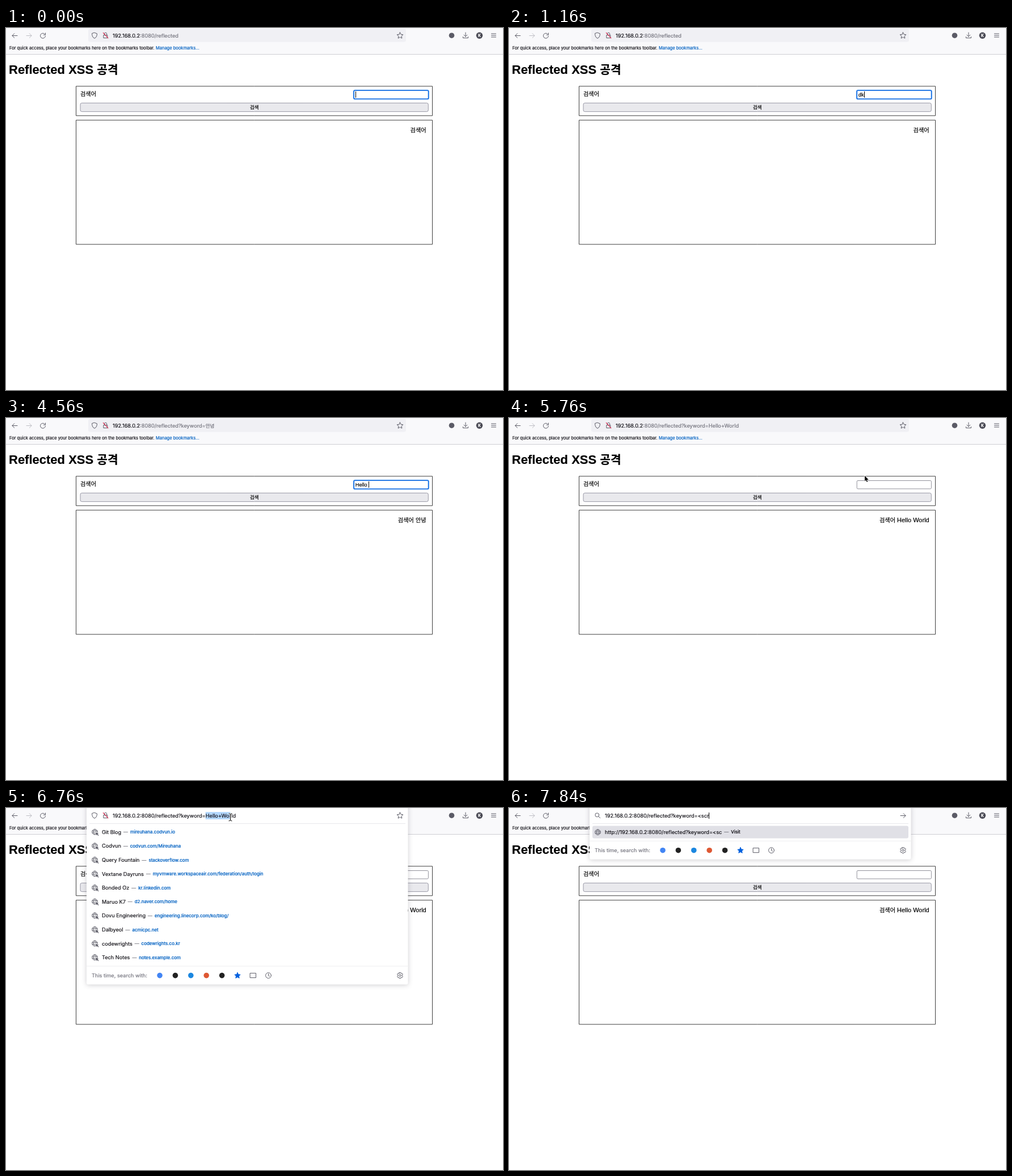
These frames come from a looping animation (876 px wide and 639 px high, 8000 ms). An HTML page with a canvas:

```html
<!DOCTYPE html>
<html lang="ko">
<head>
<meta charset="utf-8">
<title>Reflected XSS</title>
<style>
html, body { margin: 0; width: 100%; height: 100%; overflow: hidden; background: #fff; }
canvas { display: block; width: 876px; height: 639px; }
</style>
</head>
<body>
<canvas id="stage" width="876" height="639"></canvas>
<script>
const ctx = document.getElementById('stage').getContext('2d');
const LOOP = 8000, STEP = 40;
const UI = 'Inter, "Open Sans", sans-serif';
const PAGE = '"Liberation Sans", Arial, sans-serif';
const HANGUL = '"Noto Sans CJK KR", "Noto Sans CJK", "Noto Sans CJK JP", sans-serif';
const INK = '#15141a', ICON = '#5b5b66', LINK = '#0061c2', GREY = '#75757f';
const URL_SIZE = 9.2, LINK_SIZE = 7.85, FIELD_SIZE = 9.17;
const FINE = 10;      // text is laid out enlarged so advances stay fractional
const SMOOTHING = 0.2; // slight thickening of all glyphs

// ---- timelines: [start, value] ----
const HOST = '192.168.0.2', PATH = ':8080/reflected';
const typed = [
  [0, ''], [1000, 'd'], [1160, 'dk'], [1360, 'd'], [1440, ''],
  [1560, 'ㅇ'], [1640, '아'], [1720, '안'], [1800, '안ㄴ'], [1880, '안녀'], [1960, '안녕'],
  [2320, ''], [3440, 'ㅗ'], [3600, ''],
  [4080, 'H'], [4160, 'He'], [4240, 'Hel'], [4320, 'Hell'], [4400, 'Hello'],
  [4560, 'Hello '], [4640, 'Hello W'], [4720, 'Hello Wo'], [4800, 'Hello Wor'],
  [4920, 'Hello Worl'], [5040, 'Hello World'], [5440, '']
];
const focus = [[0, true], [2320, false], [2720, true], [5440, false]];
const caretOn = [[0, true], [2920, false], [3440, true], [3920, false], [4080, true]];
const query = [[0, ''], [2200, '?keyword=안녕'], [5440, '?keyword=Hello+World']];
const result = [[0, ''], [2320, ' 안녕'], [5440, ' Hello World']];
const address = [[7120, ''], [7320, '<'], [7480, '<s'], [7600, '<sc'], [7840, '<scr']];
const visit = [[7120, ''], [7360, '<'], [7520, '<s'], [7680, '<sc']];
const OPEN = 6560, EDIT = 7120, COLLAPSE = 7400;

const sites = [
  ['Git Blog', 'mireuhana.codvun.io'],
  ['Codvun', 'codvun.com/Mireuhana'],
  ['Query Fountain', 'stackoverflow.com'],
  ['Vextane Dayruns', 'myvmware.workspaceair.com/federation/auth/login'],
  ['Bonded Oz', 'kr.linkedin.com'],
  ['Maruo K7', 'd2.naver.com/home'],
  ['Dovu Engineering', 'engineering.linecorp.com/ko/blog/'],
  ['Dalbyeol', 'acmicpc.net'],
  ['codewrights', 'codewrights.co.kr'],
  ['Tech Notes', 'notes.example.com']
];

const at = (list, t) => list.reduce((v, [start, value]) => t >= start ? value : v, list[0][1]);
const ease = p => p * p * (3 - 2 * p);
const progress = (t, a, b) => Math.min(1, Math.max(0, (t - a) / (b - a)));

// ---- drawing helpers ----
function runs(str, size, family, weight) {
  return (str.match(/[\u3131-\uD7A3]+|[^\u3131-\uD7A3]+/g) || []).map(part => {
    const ko = /[\u3131-\uD7A3]/.test(part);
    const font = `${weight} ${size * FINE * (ko ? 0.925 : 1)}px ${ko ? HANGUL : family}`;
    ctx.font = font;
    return { part, font, width: ctx.measureText(part).width / FINE };
  });
}

// Draws a line of text and returns the x where it ends.
function text(str, x, y, size, { family = UI, color = INK, weight = 400, align = 0 } = {}) {
  const parts = runs(str, size, family, weight);
  x -= align * parts.reduce((sum, r) => sum + r.width, 0);
  for (const r of parts) {
    ctx.save();
    ctx.translate(x, y);
    ctx.scale(1 / FINE, 1 / FINE);
    ctx.font = r.font;
    ctx.fillStyle = ctx.strokeStyle = color;
    ctx.lineWidth = SMOOTHING * FINE;
    ctx.lineJoin = 'round';
    ctx.fillText(r.part, 0, 0);
    ctx.strokeText(r.part, 0, 0);
    ctx.restore();
    x += r.width;
  }
  return x;
}
const widthOf = (str, size, family = UI) =>
  runs(str, size, family, 400).reduce((sum, r) => sum + r.width, 0);

function rect(x, y, w, h, color) { ctx.fillStyle = color; ctx.fillRect(x, y, w, h); }

function box(x, y, w, h, r, fill, stroke, line = 1) {
  ctx.beginPath();
  ctx.roundRect(x, y, w, h, r);
  if (fill) { ctx.fillStyle = fill; ctx.fill(); }
  if (stroke) { ctx.strokeStyle = stroke; ctx.lineWidth = line; ctx.stroke(); }
}

function disc(x, y, r, color) {
  ctx.beginPath();
  ctx.arc(x, y, r, 0, 7);
  ctx.fillStyle = color;
  ctx.fill();
}

// Strokes (or fills) an SVG path placed at x, y.
function icon(d, x, y, color = ICON, line = 1, fill = null) {
  const path = new Path2D(d);
  ctx.save();
  ctx.translate(x, y);
  ctx.lineWidth = line;
  ctx.lineCap = ctx.lineJoin = 'round';
  if (fill) { ctx.fillStyle = fill; ctx.fill(path); }
  if (color) { ctx.strokeStyle = color; ctx.stroke(path); }
  ctx.restore();
}

const starPath = r => 'M' + Array.from({ length: 10 }, (_, i) => {
  const a = i * Math.PI / 5 - Math.PI / 2, k = i % 2 ? r * 0.48 : r;
  return `${k * Math.cos(a)} ${k * Math.sin(a)}`;
}).join('L') + 'Z';
const ring = r => `M${r} 0A${r} ${r} 0 1 1 ${-r} 0A${r} ${r} 0 1 1 ${r} 0`;
const RIGHT = 'M-4.5 0H4.5M.8-3.8L4.6 0L.8 3.8';
const GLOBE = ring(4.8) + 'M-4.5-1.6H4.5M-4.5 1.6H4.5M0-4.8C-3-2-3 2 0 4.8C3 2 3-2 0-4.8';
const GLOBE_HAND = 'M0 0L1.3 5.6L2.5 3.9L4.8 6L5.7 5.1L3.6 3L5.4 1.8Z';
const POINTER = 'M0 0V9.6L2.2 7.6L3.7 11L5.2 10.3L3.8 7.1H6.8Z';
const BEAM = 'M-2.5-6.5Q0-6.5 0-4.8Q0-6.5 2.5-6.5M0-4.8V4.8M-2.5 6.5Q0 6.5 0 4.8Q0 6.5 2.5 6.5';

// ---- scene parts ----
function toolbar(t) {
  rect(0, 0, 876, 46, '#f9f9fb');
  rect(0, 46, 876, 1, '#cfcfd4');
  icon('M4.5 0H-4.5M-.8-3.8L-4.6 0L-.8 3.8', 15.5, 13.5);
  icon(RIGHT, 40.5, 13.5, '#bebec4');
  icon('M3.2-3.2A4.5 4.5 0 1 0 4.5 .4M4.5-4.8V-1.6H1.3', 65, 13.7);
  disc(785.5, 13.2, 4.8, ICON);
  icon('M0-5V2M-3-.8L0 2.2L3-.8M-4.5 2.5V4.6H4.5V2.5', 810, 13);
  disc(834.5, 13.2, 5.7, '#4a4a55');
  text('K', 834.5, 15.8, 7, { color: '#fff', weight: 700, align: 0.5 });
  icon('M-4-3H4M-4 0H4M-4 3H4', 859.5, 13);
  const end = text('For quick access, place your bookmarks here on the bookmarks toolbar.', 6, 38.3, 7.5);
  text('Manage bookmarks…', end + 2.2, 38.3, 7.5, { color: LINK });
  if (t < OPEN) {
    box(145, 2, 560, 22.5, 3, '#f0f0f4');
    identity();
    const x = text(HOST, 188, 17, URL_SIZE);
    text(PATH + at(query, t), x, 17, URL_SIZE, { color: GREY });
  }
}

function identity() {
  icon('M0-5L4.4-3.4C4.6 .8 3 3.6 0 5C-3 3.6-4.6 .8-4.4-3.4Z', 156, 13.3);
  icon('M-3.3-.4H3.3V4.6H-3.3ZM-2.1-.4V-2.6A2.1 2.1 0 0 1 2.1-2.6V-.4', 175.5, 13);
  icon('M-4.2-4.6L4.4 4.8', 175.5, 13, '#e22850', 1.1);
  icon(starPath(5.7), 694.5, 13.5);
}

function page(t) {
  const label = { family: PAGE, color: '#000' };
  text('Reflected XSS 공격', 5, 80.8, 22, { ...label, weight: 700 });
  box(123.5, 102.8, 628, 52, 0, null, '#2a2a2a', 0.9);
  box(123.5, 162.7, 628, 219.2, 0, null, '#2a2a2a', 0.9);
  text('검색어', 131, 120.2, 11, label);
  box(131, 132.4, 613.3, 15.2, 2.7, '#e9e9ed', '#8f8f9d', 0.9);
  text('검색', 437.7, 143, FIELD_SIZE, { ...label, align: 0.5 });
  text('검색어' + at(result, t), 740.7, 184, 11, { ...label, align: 1 });
  input(t);
}

function input(t) {
  if (!at(focus, t)) {
    box(613.2, 110.5, 131.2, 14.5, 1.8, '#fff', '#85858f', 0.9);
    return;
  }
  box(611.6, 108.6, 134.6, 18, 3, 'rgba(0,120,240,.25)');
  box(613.2, 110.2, 131.4, 15, 1.8, '#fff', '#0061e0', 1.6);
  const str = at(typed, t);
  text(str, 615.8, 121, FIELD_SIZE, { family: PAGE, color: '#000' });
  const x = 616 + widthOf(str, FIELD_SIZE, PAGE);
  if (t >= 1560 && t < 2080) rect(616, 122.3, x - 616, 0.7, '#000');
  if (at(caretOn, t)) rect(Math.round(x), 112, 1, 11, '#000');
}

function suggestion(x, y, name, link, linkColor) {
  x = text(name, x, y + 3.2, URL_SIZE);
  x = text('—', x + 4, y + 2.8, LINK_SIZE, { color: ICON });
  text(link, x + 4, y + 2.8, LINK_SIZE, { color: linkColor, weight: 500 });
}

function siteRow([name, link], y) {
  icon(GLOBE, 156.5, y - 0.3, ICON, 0.9);
  icon(GLOBE_HAND, 157.8, y + 0.4, '#fff', 1.4);
  icon(GLOBE_HAND, 157.8, y + 0.4, null, 1, ICON);
  suggestion(169, y, name, link, LINK);
}

function footer(y) {
  rect(142, y - 17, 566, 1, '#ededf0');
  text('This time, search with:', 151, y + 3.6, 9.2, { color: GREY });
  ['#4285f4', '#222', '#1b87e0', '#de5833', '#222'].forEach((c, i) => disc(271 + i * 27.4, y, 4.8, c));
  icon(starPath(5.4), 408, y + 0.3, '#0060df', 1, '#0060df');
  icon('M-5-4H5V4H-5Z', 435.5, y);
  icon(ring(4.9) + 'M0-3V.3L2 1.6', 462.5, y);
  icon(ring(1.8), 694.5, y);
  icon('M-1.2-5H1.2L1.7-3.5L3.4-4L4.8-1.9L3.8-.6V.6L4.8 1.9L3.4 4L1.7 3.5L1.2 5H-1.2L-1.7 3.5L-3.4 4L-4.8 1.9L-3.8 .6V-.6L-4.8-1.9L-3.4-4L-1.7-3.5Z', 694.5, y);
}

function panel(t) {
  const editing = t >= EDIT;
  const footY = !editing ? 295.6 : t < COLLAPSE ? 310 : 74.7;
  ctx.save();
  ctx.shadowColor = 'rgba(58,57,68,.25)';
  ctx.shadowBlur = 9;
  ctx.shadowOffsetY = 1;
  box(142, -5, 566.5, footY + 21, 3, '#fff');
  ctx.restore();
  rect(147, 27, 557, 1, '#e8e8ec');
  footer(footY);
  if (editing) editedAddress(t); else selectedAddress(t);
}

function selectedAddress(t) {
  identity();
  const base = HOST + PATH + '?keyword=';
  const word = 188 + widthOf(base, URL_SIZE), end = 188 + widthOf(base + 'Hello+World', URL_SIZE);
  const from = t < 6640 ? 188 : word;
  const to = t < 6640 ? end : Math.min(end, Math.max(word, pointerAt(t).x));
  rect(from, 7, to - from, 13, '#b3d7ff');
  text(base + 'Hello+World', 188, 17, URL_SIZE);
  sites.forEach((site, i) => siteRow(site, 42.5 + i * 24.6));
}

function editedAddress(t) {
  icon(ring(3.4) + 'M2.5 2.5L5.4 5.4', 155.3, 12.3);
  icon(RIGHT, 694.5, 13.5);
  const base = HOST + PATH + '?keyword=';
  const x = text(base + at(address, t), 169, 17, URL_SIZE);
  rect(Math.floor(x), 8, 1, 11, '#000');
  box(147, 31.5, 557, 22, 3, '#e0e0e6');
  icon(GLOBE, 156.5, 42.7, ICON, 0.9);
  suggestion(169, 42.5, 'http://' + base + at(visit, t), 'Visit', INK);
  if (t >= COLLAPSE) return;
  text('Zunivox Suggest', 151, 66.3, 7.5, { color: GREY });
  sites.slice(0, 9).forEach((site, i) => siteRow(site, 81.7 + i * 24.62));
}

// Pointer moves: [start, end, x0, y0, x1, y1]
const moves = [
  [40, 680, 470, 592, 632, 114],
  [2680, 2720, 632, 114, 632, 114],
  [5760, 5920, 627, 102, 627, 102],
  [5880, 6440, 627, 102, 371, 16],
  [6480, 6560, 371, 16, 354, 15],
  [6640, 6840, 354, 15, 418, 17]
];

function pointerAt(t) {
  const [a, b, x0, y0, x1, y1] = moves.filter(m => t >= m[0]).pop();
  const p = ease(progress(t, a, b));
  return { x: x0 + (x1 - x0) * p, y: y0 + (y1 - y0) * p };
}

function pointer(t) {
  const shown = (t >= 40 && t < 1000) || (t >= 2680 && t < 3440) || (t >= 5760 && t < EDIT);
  if (!shown) return;
  const { x, y } = pointerAt(t);
  const inField = x > 612 && x < 746 && y > 109 && y < 127;
  if (inField || t > 6480) {
    icon(BEAM, x, y, '#fff', 2.2);
    icon(BEAM, x, y, '#000', 1);
  } else {
    icon(POINTER, x, y, '#fff', 1.5);
    icon(POINTER, x, y, null, 1, '#000');
  }
}

function draw(now) {
  const t = Math.floor((now % LOOP) / STEP) * STEP;
  rect(0, 0, 876, 639, '#fff');
  toolbar(t);
  page(t);
  if (t >= OPEN) panel(t);
  pointer(t);
}

let origin = null;
function tick(now) {
  if (origin === null) origin = now;
  draw(Math.max(0, now - origin));
  requestAnimationFrame(tick);
}
draw(0);
requestAnimationFrame(tick);
</script>
</body>
</html>
```
